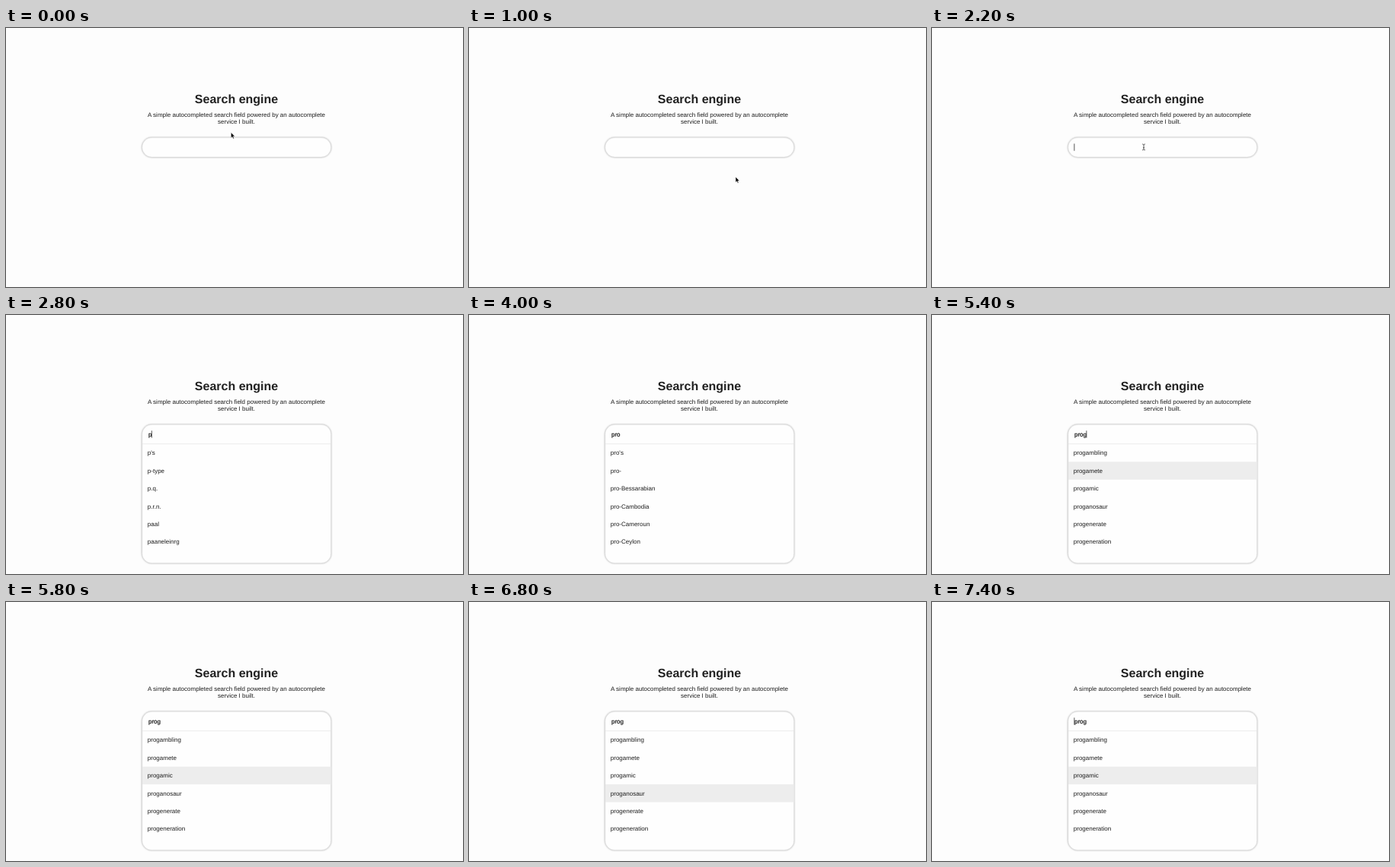
Animation, 600 px wide and 341 px high, one loop 8000 ms. Source, as an HTML page:

```html
<!DOCTYPE html>
<html lang="en">
<head>
<meta charset="utf-8">
<title>Search engine</title>
<style>
  html, body { margin: 0; width: 100%; height: 100%; overflow: hidden; background: #fdfdfd; }
  svg { display: block; width: 600px; height: 341px; }
  text { font: 8px "Liberation Sans", Arial, sans-serif; fill: #1c1c1c; text-rendering: geometricPrecision; }
  .mid { text-anchor: middle; }
  .title { font-size: 16px; font-weight: 700; fill: #212121; }
  #query { fill: #000; stroke: #000; stroke-width: .15px; }
  #panel { fill: #fefefe; stroke: #d9d9d9; stroke-width: .5px; filter: drop-shadow(0 .6px 1.1px rgba(0, 0, 0, .36)); }
</style>
</head>
<body>
<svg viewBox="0 0 600 341">
  <rect width="600" height="341" fill="#fdfdfd"/>
  <text class="mid title" x="302.5" y="98.6">Search engine</text>
  <text class="mid" x="302.5" y="117.3">A simple autocompleted search field powered by an autocomplete</text>
  <text class="mid" x="302.5" y="126.4">service I built.</text>
  <rect id="panel" x="178.7" y="144.3" width="248" height="25.6" rx="12.8"/>
  <g id="drop">
    <rect id="mark" x="179" width="247.4" height="23.4" fill="#ededed"/>
    <path d="M179 169.7H426.4" stroke="#e6e6e6" stroke-width=".7"/>
    <g id="list"></g>
  </g>
  <text id="query" x="187" y="159.8"></text>
  <rect id="caret" y="152.3" width=".9" height="9.4" fill="#444"/>
  <path id="arrow" d="M0 0V7.2L1.7 5.7L2.8 8.2L4 7.7L2.9 5.2H5.1Z" fill="#000" stroke="#fff" stroke-width=".5"/>
  <path id="beam" d="M-1.9 -3.9Q-.2 -3.9 0 -3V3Q-.2 3.9 -1.9 3.9M1.9 -3.9Q.2 -3.9 0 -3M0 3Q.2 3.9 1.9 3.9M-.9 .9H.9" fill="none" stroke="#333" stroke-width=".8"/>
</svg>
<script>
  const LOOP = 8000, ROW = 23.4, TOP = 169.9, ROWS = 6;
  const $ = id => document.getElementById(id);

  const words = {
    p: ["p's", "p-type", "p.q.", "p.r.n.", "paal", "paaneleinrg"],
    pr: ["pr", "pr.", "praam", "prabble", "prabhu", "practic"],
    pro: ["pro's", "pro-", "pro-Bessarabian", "pro-Cambodia", "pro-Cameroun", "pro-Ceylon"],
    prog: ["progambling", "progamete", "progamic", "proganosaur", "progenerate", "progeneration"]
  };

  // Each track is a list of [start time, value]; a value holds until the next one.
  const typed = [[0, ""], [2600, "p"], [3100, "pr"], [3500, "pro"], [4300, "prog"]];
  const listed = [[0, ""], [2700, "p"], [3200, "pr"], [3600, "pro"], [4300, "prog"]];
  const marked = [[0, -1], [5100, 0], [5300, 1], [5800, 2], [6300, 3], [7300, 2]];
  const carets = [[0, ""], [400, "end"], [700, ""], [1300, "end"], [1700, ""], [2200, "end"],
    [4000, ""], [4300, "end"], [4800, ""], [5400, "end"], [5800, ""], [6400, "end"],
    [6800, ""], [7400, "start"]];
  const pointer = [[0, ["arrow", 295.4, 137.6]], [200, ["arrow", 289, 143]],
    [300, ["beam", 278, 156.8]], [900, ["arrow", 400.6, 242]], [1000, ["arrow", 350, 196]],
    [1100, ["arrow", 291, 137.6]], [1300, ["beam", 278, 156.8]], [2600, ["none", 0, 0]]];

  const at = (track, t) => {
    let value = track[0][1];
    for (const [start, v] of track) if (t >= start) value = v;
    return value;
  };
  const show = (el, on) => el.setAttribute("visibility", on ? "visible" : "hidden");

  const items = Array.from({ length: ROWS }, (_, i) => {
    const item = document.createElementNS("http://www.w3.org/2000/svg", "text");
    item.setAttribute("x", 185.8);
    item.setAttribute("y", 184.4 + i * ROW);
    return $("list").appendChild(item);
  });

  const advance = { p: 4.45, r: 2.66, o: 4.45, g: 4.45 };
  const widthOf = s => [...s].reduce((sum, c) => sum + advance[c], 0);

  function draw(t) {
    const query = at(typed, t), key = at(listed, t);
    const row = at(marked, t), caret = at(carets, t);
    const [kind, x, y] = at(pointer, t);

    $("query").textContent = query;
    $("panel").setAttribute("height", key ? 182.4 : 25.6);
    $("drop").style.display = key ? "" : "none";
    items.forEach((item, i) => item.textContent = key ? words[key][i] : "");

    show($("mark"), row >= 0);
    $("mark").setAttribute("y", TOP + Math.max(row, 0) * ROW);

    show($("caret"), caret);
    $("caret").setAttribute("x", 186.4 + (caret === "end" ? widthOf(query) : 0));

    for (const id of ["arrow", "beam"]) {
      show($(id), id === kind);
      $(id).setAttribute("transform", `translate(${x} ${y})`);
    }
  }

  const origin = performance.now();
  function tick() {
    draw((performance.now() - origin) % LOOP);
    requestAnimationFrame(tick);
  }
  draw(0);
  requestAnimationFrame(tick);
</script>
</body>
</html>
```
